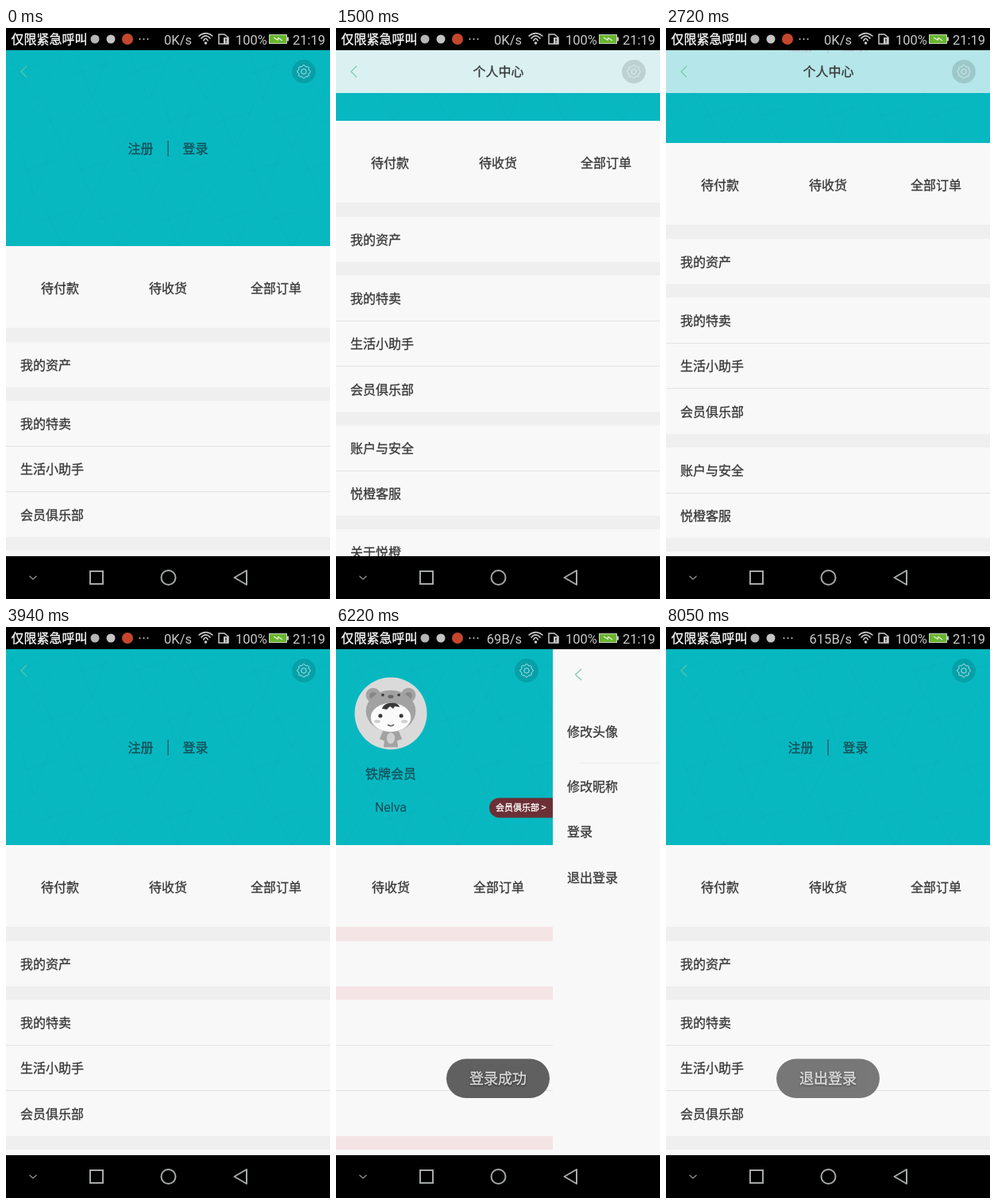
These frames come from a looping animation (408 by 720 pixels, 8.11 s). An HTML page:

```html
<!DOCTYPE html>
<html lang="zh-CN">
<head>
<meta charset="utf-8">
<title>个人中心</title>
<style>
  html, body { margin: 0; width: 100%; height: 100%; overflow: hidden; background: #000; }
  svg { display: block; width: 100%; height: 100%; }
  text { font-family: "Noto Sans CJK SC", "Noto Sans CJK", "Noto Sans", sans-serif; stroke-width: .3px; }
  .latin { font-family: Roboto, "Open Sans", sans-serif; stroke-width: 0; }
</style>
</head>
<body>
<svg id="stage" viewBox="0 0 408 720"></svg>
<script>
const LOOP = 8110, W = 408, TEAL = '#08b8c1', PAPER = '#f8f8f8', INK = '#383838';

const rect = (x, y, w, h, fill, more = '') =>
  `<rect x="${x}" y="${y}" width="${w}" height="${h}" fill="${fill}" ${more}/>`;
const circle = (x, y, r, fill, more = '') =>
  `<circle cx="${x}" cy="${y}" r="${r}" fill="${fill}" ${more}/>`;
const oval = (x, y, rx, ry, fill) =>
  `<ellipse cx="${x}" cy="${y}" rx="${rx}" ry="${ry}" fill="${fill}"/>`;
const path = (d, stroke, width = 1, more = '') =>
  `<path d="${d}" fill="none" stroke="${stroke}" stroke-width="${width}" ${more}/>`;
// y is the visual middle of the line
const label = (s, x, y, { size = 16, fill = INK, anchor = 'start', more = '' } = {}) =>
  `<text x="${x}" y="${y + size * 0.37}" font-size="${size}" fill="${fill}" stroke="${fill}" text-anchor="${anchor}" ${more}>${s}</text>`;
const mid = (s, x, y, opt = {}) => label(s, x, y, { ...opt, anchor: 'middle' });
const group = (id, body, more = '') => `<g id="${id}" ${more}>${body}</g>`;

function gear(x, y) {
  let d = '';
  for (let i = 0; i < 32; i++) {
    const a = (i - 0.5) / 32 * Math.PI * 2, r = i % 4 < 2 ? 8.2 : 6.8;
    d += (i ? 'L' : 'M') + (x + r * Math.cos(a)).toFixed(1) + ' ' + (y + r * Math.sin(a)).toFixed(1);
  }
  return circle(x, y, 15, '#000', 'opacity=".13"') +
    `<g opacity=".8">${path(d + 'Z', '#e4f3f3')}${circle(x, y, 3.2, 'none', 'stroke="#e4f3f3"')}</g>`;
}

function avatar(x, y, r) {
  const hood = '#a2a2a2', dark = '#383838';
  const ears = [-22, 22].map(e => circle(e, -23, 9, hood) + circle(e, -22, 4.5, '#868686')).join('');
  const face = [-13, 13].map(e =>
    circle(e, 3, 2.5, dark) + oval(e * 1.3, 10, 4, 2, '#cfcfcf')).join('');
  return `<g transform="translate(${x} ${y}) scale(${r / 45})">` +
    circle(0, 0, 45, '#dadada') +
    `<path d="M-9 20L-14 32L-8 34L-9 42L9 42L8 34L14 32L9 20Z" fill="${hood}"/>` +
    oval(0, 31, 5, 7, '#d0d0d0') + ears + oval(0, -3, 31, 26, hood) +
    circle(-10, -23, 1.8, dark) + circle(10, -23, 1.8, dark) + oval(0, -21, 3.5, 2.2, '#666') +
    oval(0, 5, 25, 18, '#fafafa') +
    `<path d="M-11 -6Q-8 -13 0 -13Q9 -14 11 -8L5 -9L3 -6L-1 -9L-5 -5Z" fill="${dark}"/>` +
    face + path('M-4 14Q0 17 4 14', '#555', 1.4) + '</g>';
}

// Faint mesh on the teal banner
function mesh() {
  let d = '';
  for (let i = -1; i < 7; i++)
    for (let j = 0; j < 4; j++) {
      const x = i * 72 + (j % 2) * 36, y = 28 + j * 62, k = (i * 5 + j * 3) % 7 * 3;
      d += `M${x + k} ${y}L${x + 36} ${y + 62}L${x + 72 - k} ${y + 6}M${x + k} ${y + 30}l44 -14`;
    }
  return path(d, '#067f8c', 0.8, 'opacity=".12" clip-path="url(#banner)"');
}

function mainPage() {
  const bands = [[378, 18], [453, 17], [642, 17], [773, 17]];
  const seps = [527, 584, 716, 848];
  const rows = [['我的资产', 425], ['我的特卖', 499], ['生活小助手', 556.5], ['会员俱乐部', 614],
    ['账户与安全', 688], ['悦橙客服', 745.5], ['关于悦橙', 819.5]];
  const faded = { fill: '#155059' };
  const guest = label('注册', 153.5, 152.5, faded) + rect(203.5, 142, 1.2, 20, '#155059') +
    label('登录', 222.5, 152.5, faded);
  const member = avatar(204, 109, 45.5) + mid('铁牌会员', 204, 185, faded) +
    mid('Nelva', 204, 227, { ...faded, more: 'class="latin"' }) +
    rect(328, 215.5, 100, 25, '#6b2f35', 'rx="12.5"') +
    label('会员俱乐部 &gt;', 336, 228, { size: 11, fill: '#fff' });
  const list = rect(0, 28, W, 247, TEAL) + mesh() + group('guest', guest) + group('member', member) +
    mid('待付款', 68, 328) + mid('待收货', 204, 328) + mid('全部订单', 340, 328) +
    group('bands', bands.map(([y, h]) => rect(0, y, W, h, 'inherit')).join('')) +
    seps.map(y => rect(0, y, W, 1, '#e3e3e3')).join('') +
    rows.map(([s, y]) => label(s, 18, y)).join('');
  return rect(0, 28, W, 640, PAPER) + group('list', list) +
    group('bar', rect(0, 28, W, 54, PAPER)) +
    group('title', mid('个人中心', 204.5, 55.5)) +
    path('M26 48L19 55L26 62', '#6cc796', 1.2, 'opacity=".85"') + gear(375, 55);
}

function settingsPage() {
  const rows = [['修改头像', 132], ['修改昵称', 201], ['登录', 258.5], ['退出登录', 316]];
  return rect(0, 28, W, 640, PAPER) +
    path('M36 53L28.5 60L36 67', '#85c9b2', 1.3) + mid('修改个人资料', 204, 60, { size: 18 }) +
    avatar(361.5, 132, 28) + rect(33, 171, 375, 1, '#ececec') +
    rows.map(([s, y]) => label(s, 18, y)).join('');
}

function statusBar() {
  const grey = '#c9c9c9', latin = 'class="latin"';
  const arcs = [9, 6, 3].map(r =>
    path(`M${251.5 - r} ${19.5 - r}Q251.5 ${13.5 - r * 1.2} ${251.5 + r} ${19.5 - r}`, grey, 1.6)).join('');
  return rect(0, 0, W, 28, '#000') +
    label('仅限紧急呼叫', 6.5, 14.5, { fill: '#fff' }) +
    circle(112, 14, 5.5, '#b5b5b5') + circle(132, 14, 5.5, '#c4c4c4') +
    group('app', circle(153, 14, 7, '#c4472d')) +
    group('dots', [0, 5, 10].map(x => circle(168.5 + x, 14, 1, grey)).join('')) +
    label('0K/s', 234, 14.7, { size: 16.5, fill: grey, anchor: 'end', more: latin + ' id="speed"' }) +
    arcs + circle(251.5, 19, 1.8, grey) +
    path('M268 8H275L280 12V20H268Z', grey, 1.5) + rect(274, 12, 6, 8, grey) +
    rect(276.4, 13.5, 1.2, 3.2, '#000') + rect(276.4, 17.6, 1.2, 1.2, '#000') +
    label('100%', 289, 14.7, { size: 16.5, fill: grey, more: latin }) +
    rect(331.5, 8.5, 22, 11, '#69b52f', 'stroke="#c9d5bf"') + rect(354, 11.5, 2, 5, grey) +
    path('M337 12L342 15L343 12.5L348 16', '#e6f2dc', 1.3) +
    label('21:19', 361, 14.7, { size: 16.5, fill: grey, more: latin });
}

function navBar() {
  const c = '#a5aaa6';
  return rect(0, 666, W, 54, '#000') + path('M29.5 691L34 695L38.5 691', '#858a86', 1.5) +
    path('M106 685H122V701H106Z', c, 2) +
    circle(204.5, 693, 9, 'none', `stroke="${c}" stroke-width="2"`) +
    path('M287.5 693L303 684V702Z', c, 2, 'stroke-linejoin="round"');
}

const stage = document.getElementById('stage');
stage.innerHTML = `<defs><clipPath id="banner">${rect(0, 28, W, 247, '#000')}</clipPath></defs>` +
  group('main', mainPage()) + group('settings', settingsPage()) +
  group('toast', rect(139, 544.5, 130, 49.5, '#606060', 'rx="24.75"') +
    mid('', 204, 569.5, { size: 18, fill: '#fff', more: 'id="message" style="text-shadow:0 1px 2px #222"' })) +
  statusBar() + navBar();

const $ = Object.fromEntries([...stage.querySelectorAll('[id]')].map(e => [e.id, e]));
const clamp = v => Math.max(0, Math.min(1, v));
const ramp = (t, a, b) => clamp((t - a) / (b - a));
const smooth = u => u * u * (3 - 2 * u);

function track(keys, t) {
  for (let i = 1; i < keys.length; i++) {
    const [a, from] = keys[i - 1], [b, to] = keys[i];
    if (t < b) return from + (to - from) * smooth(ramp(t, a, b));
  }
  return keys[keys.length - 1][1];
}

const SCROLL = [[0, 0], [120, 0], [1150, 158], [1550, 158], [2050, 190], [2400, 190], [3257, 0]];
const SLIDE = [[0, W], [4350, W], [4700, 0], [6050, 0], [6328, W], [6500, W], [6850, 0], [7200, 0], [7520, W]];
const TOASTS = [['登录成功', 5350, 6500], ['退出登录', 6980, 8000]];

// Whole pixels keep page edges crisp
const move = (el, x, y) => el.setAttribute('transform', `translate(${Math.round(x)} ${Math.round(y)})`);
const fade = (el, v) => el.setAttribute('opacity', v.toFixed(3));
const setText = (el, s) => { if (el.textContent !== s) el.textContent = s; };

function draw(t) {
  const scroll = track(SCROLL, t), x = track(SLIDE, t);
  move($.list, 0, -scroll);
  move($.main, x - W, 0);
  move($.settings, x, 0);

  const alpha = clamp(scroll / 180);
  fade($.bar, alpha);
  fade($.title, clamp(alpha * 1.5));

  const member = t >= 5350 && t < 6980;
  fade($.guest, member ? 0 : 1);
  fade($.member, member ? 1 : 0);
  $.bands.setAttribute('fill', member ? '#f5e4e6' : '#efefef');

  const toast = TOASTS.find(([, a, b]) => t >= a && t < b + 330);
  fade($.toast, toast ? ramp(t, toast[1] - 20, toast[1] + 80) * (1 - ramp(t, toast[2], toast[2] + 330)) : 0);
  if (toast) setText($.message, toast[0]);

  const busy = t >= 6980;
  setText($.speed, busy ? '615B/s' : t >= 5050 ? '69B/s' : '0K/s');
  fade($.app, busy ? 0 : 1);
  move($.dots, busy ? -20 : 0, 0);
}

const start = performance.now();
function tick() {
  draw((performance.now() - start) % LOOP);
  requestAnimationFrame(tick);
}
tick();
</script>
</body>
</html>
```
